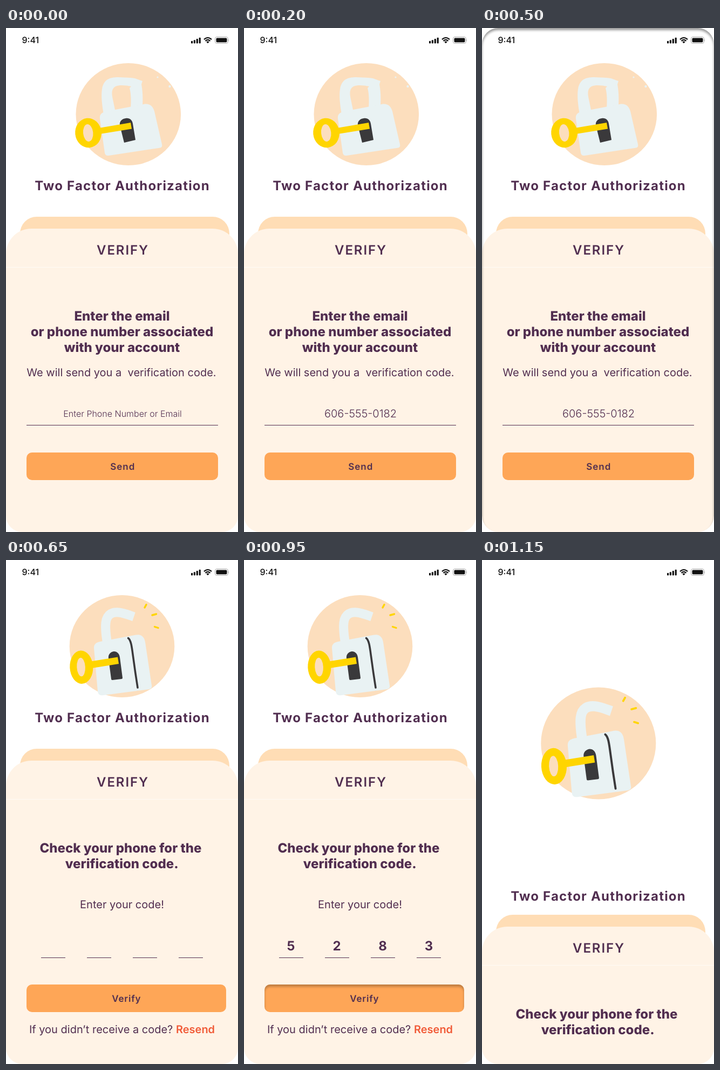
An HTML page for the animation above (1300 ms loop, 430 by 932 pixels).

```html
<!DOCTYPE html>
<html lang="en">
<head>
<meta charset="utf-8">
<title>Two Factor Authorization</title>
<style>
  html, body { margin: 0; width: 100%; height: 100%; overflow: hidden; background: #fff; }
  #stage { position: relative; width: 430px; height: 932px; overflow: hidden; border-radius: 0 0 30px 30px; }
  svg { display: block; }
  text {
    font: 400 20px Inter, sans-serif; font-optical-sizing: none;
    text-rendering: geometricPrecision;
    fill: #512e50; text-anchor: middle; white-space: pre;
  }
  .title { font-weight: 700; font-size: 24px; letter-spacing: 1.2px; }
  .tab { font-weight: 600; font-size: 24px; letter-spacing: 1.9px; }
  .head { font-weight: 800; font-size: 24px; }
  .digit { font-weight: 700; font-size: 24px; }
  .hint { font-weight: 300; font-size: 16px; }
  .number { font-weight: 300; }
  .button { font-weight: 600; font-size: 17px; letter-spacing: 1px; }
  .verify { letter-spacing: .8px; }
  .clock { font-weight: 500; font-size: 16px; fill: #111; text-anchor: start; }
  .link { font-weight: 600; fill: #f15b38; }
  .metal { fill: #e9f2f3; }
  .dark { fill: #3a393b; }
  .gold { fill: #ffd500; }
  .shade { position: absolute; box-shadow: inset 0 4px 4px rgba(0, 0, 0, .25); border-radius: 10px; }
  .press { left: 38px; top: 785px; height: 51px; }
  .frame { inset: 0; border-radius: 30px; box-shadow: inset 0 4px 4px rgba(0, 0, 0, .4); }
</style>
</head>
<body>
<div id="stage">
  <svg width="430" height="932" viewBox="0 0 430 932">
    <g fill="#111">
      <text class="clock" x="29.5" y="28">9:41</text>
      <rect x="343" y="24" width="3.2" height="4.5" rx="1"/>
      <rect x="347.8" y="22.3" width="3.2" height="6.2" rx="1"/>
      <rect x="352.7" y="20" width="3.2" height="8.5" rx="1"/>
      <rect x="357.6" y="17.8" width="3.2" height="10.7" rx="1"/>
      <g fill="none" stroke="#111" stroke-width="2.3">
        <path d="M367 21.2Q374 14.6 381 21.2"/>
        <path d="M369.5 24Q374 19.8 378.5 24"/>
      </g>
      <path d="M371.3 25.6Q374 23.4 376.7 25.6L374 28.4Z"/>
      <rect x="387.5" y="16.5" width="24" height="12" rx="3.3" fill="none" stroke="#aaa"/>
      <rect x="389.5" y="18.5" width="20" height="8" rx="1.8"/>
      <path d="M412.5 20.5Q414 22.5 412.5 24.5Z" fill="#aaa"/>
    </g>

    <g data-part="closed">
      <ellipse cx="226.8" cy="159.5" rx="97.3" ry="94.5" fill="#fcdebd"/>
      <path class="metal" d="M181 160C178 142 176 126 178 113C181 95 192 91 208 91L230 92C239 92 246 96 253 98L251 104C253 115 254 128 253 145L231 150C232 136 232 122 229 111L232 108C222 106 210 105 203 108C196 112 196 118 197 127L203 156Z"/>
      <path class="metal" d="M174 168C173 160 177 156 187 154L255 141C266 139 272 144 275 154L289 215C290 220 288 221.5 283 222L190 236C186 236.5 184 235 183 231Z"/>
      <circle class="metal" cx="281" cy="91" r="1.6"/>
      <circle class="metal" cx="303.5" cy="108" r="2.2"/>
      <path class="dark" d="M211 180C210 172 215 168 222 167C229 166 234 170 235 177L240 207L219 212Z"/>
      <path class="gold" d="M172 185L231 175L233 186.5L174 196Z"/>
      <path class="gold" fill-rule="evenodd" transform="rotate(-6 152.5 194)" d="M128.2 194a24.3 27.3 0 1 0 48.6 0a24.3 27.3 0 1 0-48.6 0ZM143 194a9.2 16 0 1 0 18.4 0a9.2 16 0 1 0-18.4 0Z"/>
    </g>

    <g data-part="open" id="openLock">
      <ellipse cx="215" cy="159.5" rx="97.3" ry="94.5" fill="#fcdebd"/>
      <path d="M188 156C185 138 184 125 185 116C187 99 198 96 209 97C219 98 228 102 237 105" fill="none" stroke="#e9f2f3" stroke-width="17"/>
      <path class="metal" d="M163 163C163 156 166 153 174 151L238 139C250 136 256 141 258 152L270 232C271 236 269 238 265 239L181 250C174 251 171 249 170 243Z"/>
      <path d="M226.5 144.5C231.500 148 233 159 235.5 178Q239.500 208 244 236" fill="none" stroke="#3a393b" stroke-width="3.6" stroke-linecap="round"/>
      <path class="dark" d="M190 182C189 174 194 170 200 169C206 169 210 173 211 180L216 218Q216 220 214 220L197 222Q195 222 195 220Z"/>
      <path class="gold" d="M157 187.5L207 179.5L209 192L159 200Z"/>
      <path class="gold" fill-rule="evenodd" transform="rotate(-3 139.8 198.2)" d="M118.3 198.2a21.500 30.700 0 1 0 43 0a21.500 30.700 0 1 0-43 0ZM131.300 198a7.800 17.300 0 1 0 15.600 0a7.800 17.300 0 1 0-15.600 0Z"/>
      <path d="M257 88L260 82.5M271 102L278.5 100M275.5 123.5L282 125.5" stroke="#ffd500" stroke-width="3.4" stroke-linecap="round"/>
    </g>

    <text class="title" id="title" x="215.6" y="300">Two Factor Authorization</text>

    <g id="panel">
      <rect x="26" y="349" width="388" height="80" rx="31" fill="#ffddb5"/>
      <rect y="371" width="430" height="640" rx="47" fill="#fff3e6"/>
      <path d="M0 442.5H430" stroke="#fff" stroke-opacity=".6"/>
      <text class="tab" x="216.5" y="419">VERIFY</text>

      <g data-part="ask">
        <text class="head" x="215" y="541">Enter the email</text>
        <text class="head" x="215" y="570">or phone number associated</text>
        <text class="head" x="215" y="599">with your account</text>
        <text x="214" y="644">We will send you a  verification code.</text>
        <path d="M38 734.5H393" stroke="#512e50"/>
        <rect x="38" y="785" width="355" height="51" rx="10" fill="#fea657"/>
        <text class="button" x="216.2" y="817">Send</text>
      </g>
      <text class="hint" data-part="hint" x="216" y="719">Enter Phone Number or Email</text>
      <text class="number" data-part="number" x="216" y="720">606-555-0182</text>

      <g data-part="check">
        <text class="head" x="212.5" y="541">Check your phone for the</text>
        <text class="head" x="214.7" y="570">verification code.</text>
        <text x="215" y="644">Enter your code!</text>
        <path d="M65 735.5h45m40 0h45m40 0h45m40 0h45" stroke="#512e50"/>
        <rect x="38" y="785" width="370" height="51" rx="10" fill="#fea657"/>
        <text class="button verify" x="223.3" y="817">Verify</text>
        <text x="215" y="875">If you didn’t receive a code? <tspan class="link">Resend</tspan></text>
      </g>
      <g data-part="code">
        <text class="digit" x="87" y="722">5</text>
        <text class="digit" x="172" y="722">2</text>
        <text class="digit" x="257" y="722">8</text>
        <text class="digit" x="342.5" y="722">3</text>
      </g>
    </g>
  </svg>
  <div class="shade press" style="width:355px" data-part="pressSend"></div>
  <div class="shade press" style="width:370px" data-part="pressVerify"></div>
  <div class="shade frame" data-part="frame"></div>
</div>
<script>
  const LOOP = 1300;
  const steps = [
    { at: 0, show: 'closed ask hint' },
    { at: 200, show: 'closed ask number' },
    { at: 350, show: 'closed ask number frame pressSend' },
    { at: 500, show: 'closed ask number frame' },
    { at: 650, show: 'open check' },
    { at: 800, show: 'open check code' },
    { at: 950, show: 'open check code pressVerify' },
    { at: 1150, show: 'open check code', lowered: true }
  ];
  const parts = [...document.querySelectorAll('[data-part]')];
  const move = (id, value) => document.getElementById(id).setAttribute('transform', value);
  let current;

  function apply({ show, lowered }) {
    const visible = new Set(show.split(' '));
    for (const part of parts) part.style.display = visible.has(part.dataset.part) ? '' : 'none';
    move('title', lowered ? 'translate(0 330)' : '');
    move('panel', lowered ? 'translate(0 307)' : '');
    move('openLock', lowered ? 'translate(215.8 339) scale(1.095) translate(-215 -159.5)' : '');
  }

  const start = performance.now();
  function draw(now) {
    const time = Math.max(0, now - start) % LOOP;
    const step = steps.findLast(s => s.at <= time);
    if (step !== current) apply(current = step);
    requestAnimationFrame(draw);
  }
  draw(start);
</script>
</body>
</html>
```
